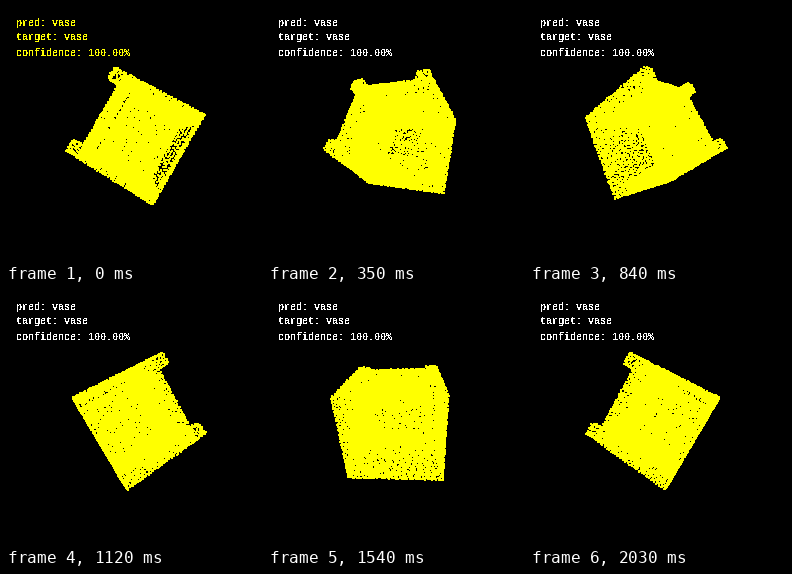
A matplotlib script for the animation above (2.1 s loop, 256 px wide and 256 px high).

```python
import numpy as np
import matplotlib.pyplot as plt
from matplotlib.animation import FuncAnimation

SIZE, DPI = 256, 64
FRAMES, INTERVAL = 30, 70
DIST = SIZE / 2 / np.tan(np.radians(30))   # 60 degree field of view
TILT = np.radians(-30)
SPACING = 2.45
PX = 72 / DPI
YELLOW = "#ffff00"

rng = np.random.default_rng(4)


def quad(p, q, r, s):
    """Spread points evenly, with some jitter, over the quad p-q-r-s."""
    p, q, r, s = (np.array(c, float) for c in (p, q, r, s))
    cols = max(2, round(np.linalg.norm(q - p) / SPACING))
    rows = max(2, round(np.linalg.norm(s - p) / SPACING))
    i, j = np.meshgrid(np.arange(cols), np.arange(rows))
    i = i + 0.25 + 0.5 * (j % 2) + rng.uniform(-0.3, 0.3, i.shape)
    j = j + 0.5 + rng.uniform(-0.3, 0.3, j.shape)
    u = np.clip(i / cols, 0, 1).reshape(-1, 1)
    v = np.clip(j / rows, 0, 1).reshape(-1, 1)
    return (1 - v) * ((1 - u) * p + u * q) + v * ((1 - u) * s + u * r)


def ring(h, b, w):
    return [(h, b, w), (h, b, -w), (h, -b, -w), (h, -b, w)]


def sides(low, high):
    """Four faces joining two rings of corners."""
    return [quad(low[k], low[k - 1], high[k - 1], high[k]) for k in range(4)]


def foot(sb, sw, low=-41.5, high=-31.5, width=10.5):
    def corners(h):
        b0, b1 = sb * 40, sb * (40 - width)
        w0, w1 = sw * 41, sw * (41 - width)
        return [(h, b0, w0), (h, b0, w1), (h, b1, w1), (h, b1, w0)]
    return sides(corners(low), corners(high)) + [quad(*corners(low))]


def planter():
    base, rim = ring(-31.5, 40, 41.5), ring(41.5, 42, 44.5)
    floor, mouth = ring(-19, 32, 32), ring(41.5, 32, 32)
    parts = sides(base, rim) + sides(floor, mouth) + sides(mouth, rim)
    parts += [quad(*base), quad(*floor)]
    for sb in (-1, 1):
        for sw in (-1, 1):
            parts += foot(sb, sw)
    h, b, w = np.vstack(parts).T
    x = h * np.cos(TILT) - b * np.sin(TILT)
    y = h * np.sin(TILT) + b * np.cos(TILT)
    return x, y, w


X, Y, Z = planter()


def project(angle):
    c, s = np.cos(angle), np.sin(angle)
    scale = DIST / (DIST - (Z * c - X * s))
    return SIZE / 2 + scale * (X * c + Z * s), SIZE / 2 - scale * Y


fig = plt.figure(figsize=(SIZE / DPI, SIZE / DPI), dpi=DPI, facecolor="black")
ax = fig.add_axes([0, 0, 1, 1])
ax.set(xlim=(0, SIZE), ylim=(SIZE, 0))
ax.axis("off")

cloud, = ax.plot([], [], "s", color=YELLOW, ms=2 * PX, mew=0, antialiased=False)
lines = ["pred: vase", "target: vase", "confidence: 100.00%"]
labels = [
    ax.text(9.5, 19.5 + 15 * k, line, family="Liberation Mono", weight="bold",
            size=10 * PX, va="baseline", antialiased=False)
    for k, line in enumerate(lines)
]


def update(frame):
    cloud.set_data(*project(2 * np.pi * frame / FRAMES))
    for label in labels:
        label.set_color("white" if frame else YELLOW)
    return [cloud, *labels]


anim = FuncAnimation(fig, update, frames=FRAMES, interval=INTERVAL,
                     repeat=True, repeat_delay=0)
plt.show()
```
